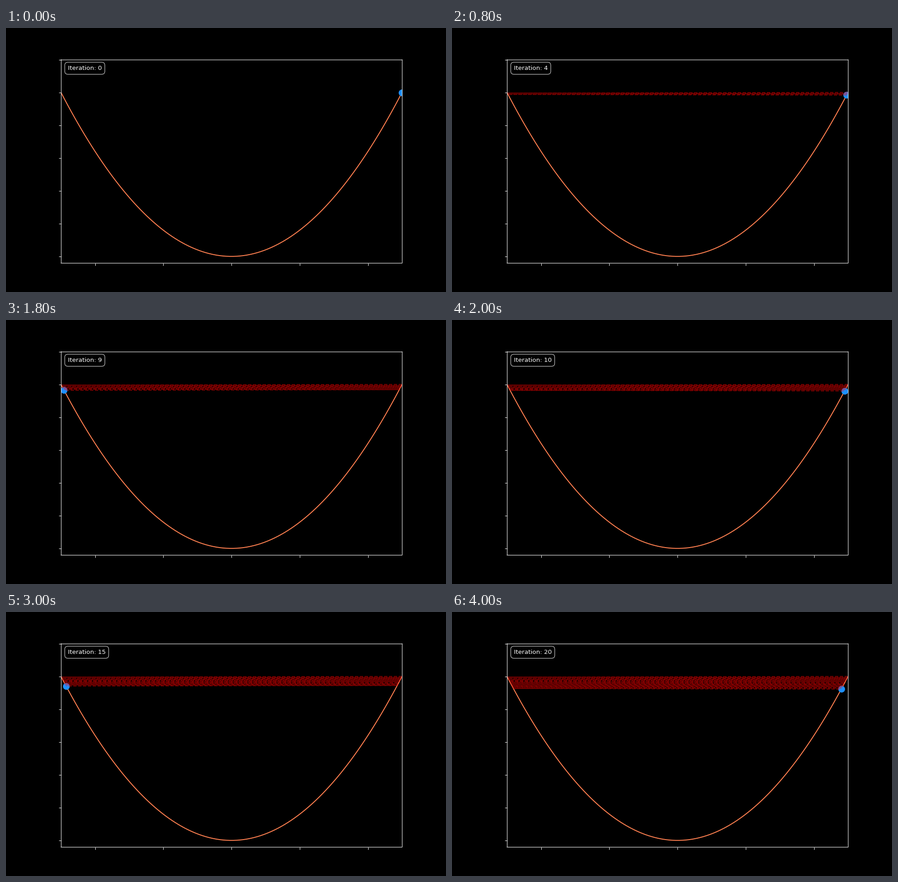
A matplotlib script that plays this animation: 966x580 px, repeating every 4.2 s.

```python
import matplotlib.pyplot as plt
import numpy as np
from matplotlib.animation import FuncAnimation

FRAMES = 21
INTERVAL = 200
START = 5.0
LEARNING_RATE = 0.999
HALF_PIXEL = 0.36  # in points


def cost(x):
    return x ** 2


def gradient(x):
    return 2 * x


def descend(steps):
    """Positions visited by gradient descent, start included."""
    xs = [START]
    for _ in range(steps):
        xs.append(xs[-1] - LEARNING_RATE * gradient(xs[-1]))
    return np.array(xs)


plt.style.use("dark_background")
plt.rcParams["font.family"] = "DejaVu Sans"
plt.rcParams["path.snap"] = False

# 966 x 580 pixels
fig, ax = plt.subplots(figsize=(10, 6.0042), dpi=96.6)
ax.set_xlim(-5, 5)
ax.set_ylim(-1, 30)

# Soft frame lines, moved half a pixel right and down
for side in ("right", "bottom"):
    ax.spines[side].set_position(("outward", HALF_PIXEL))
for side in ("left", "top"):
    ax.spines[side].set_position(("outward", -HALF_PIXEL))

ax.set_xticks(range(-4, 5, 2))
ax.set_yticks(range(0, 31, 5))
ax.tick_params(labelbottom=False, labelleft=False)

grid = np.linspace(-5, 5, 100)
ax.plot(grid, cost(grid), color="coral", lw=1.5)
dot, = ax.plot([], [], "o", color="dodgerblue", markersize=10)
trail, = ax.plot([], [], "--", color="red", lw=1.5, alpha=0.5)
label = ax.text(
    0.02, 0.95, "", transform=ax.transAxes, fontsize=10, color="white",
    bbox=dict(boxstyle="round,pad=0.5", facecolor="black",
              edgecolor="white", alpha=0.7),
)

path = descend(FRAMES - 1)


def update(i):
    xs = path[:i + 1]
    trail.set_data(xs, cost(xs))
    dot.set_data(xs[-1:], cost(xs[-1:]))
    label.set_text(f"Iteration: {i}")
    return trail, dot, label


anim = FuncAnimation(fig, update, frames=FRAMES, interval=INTERVAL,
                     repeat=True, repeat_delay=0)
plt.show()
```
